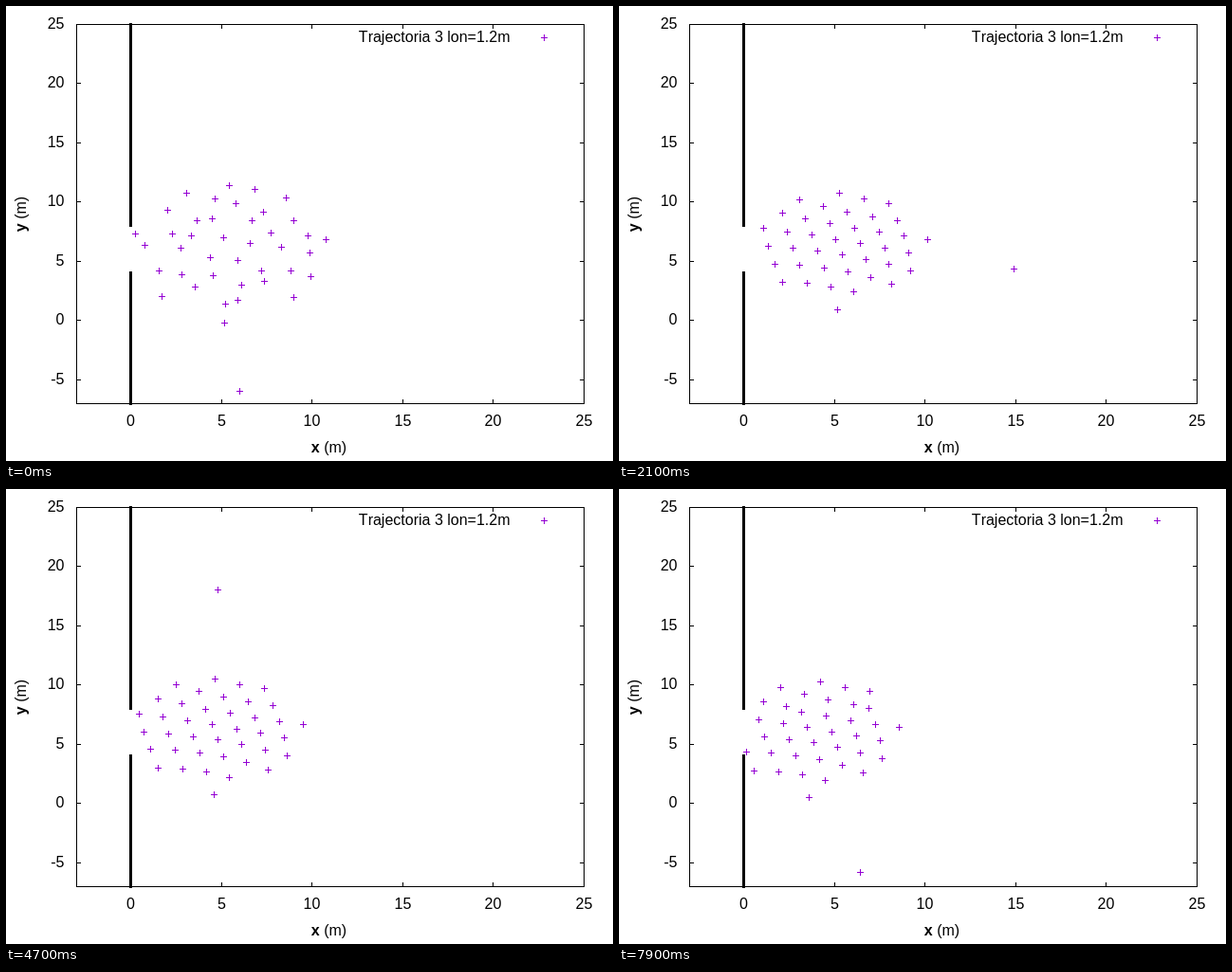
An HTML page for the animation above (8000 ms loop, 640x480 px).

```html
<!DOCTYPE html>
<html lang="es">
<head>
<meta charset="utf-8">
<title>Trajectoria 3</title>
<style>
  html, body { margin: 0; width: 100%; height: 100%; overflow: hidden; background: #fff; }
  svg { display: block; width: 640px; height: 480px; }
  text { font: 16px "Liberation Sans", Arial, sans-serif; font-kerning: none; fill: #000; }
  path { fill: none; stroke: #000; stroke-width: 1; shape-rendering: crispEdges; }
  .wall { stroke-width: 3; }
  .marks { stroke: #9400d3; }
  .bold { font-weight: bold; }
  .mid { text-anchor: middle; }
  .end { text-anchor: end; }
</style>
</head>
<body>
<svg viewBox="0 0 640 480">
  <path id="axis"/>
  <g id="labels"></g>
  <text class="mid" x="340.5" y="471"><tspan class="bold">x</tspan> (m)</text>
  <text class="mid" transform="translate(21 219.5) rotate(-90)"><tspan class="bold">y</tspan> (m)</text>
  <text class="end" x="531.5" y="38">Trajectoria 3 lon=1.2m</text>
  <path class="wall" d="M131.5 18V233M131.5 280V421"/>
  <path class="marks" id="marks"/>
</svg>
<script>
const LOOP = 8000, STEP = 100;
const byId = id => document.getElementById(id);
const clamp = v => Math.min(1, Math.max(0, v));

// Axes: 5 m per tick
function drawAxes() {
  let d = 'M74.5 19.5H609.5V419.5H74.5Z', text = '';
  for (let v = -5; v <= 25; v += 5) {
    const y = Math.round(331.4 - v * 12.5);
    d += `M74 ${y + 0.5}h5M610 ${y + 0.5}h-5`;
    text += `<text class="end" x="61.5" y="${y + 5}">${v}</text>`;
    if (v < 0) continue;
    const x = Math.round(131.3 + v * 19.1);
    d += `M${x + 0.5} 19v5M${x + 0.5} 420v-5`;
    text += `<text class="mid" x="${x + 0.5}" y="443">${v}</text>`;
  }
  byId('axis').setAttribute('d', d);
  byId('labels').innerHTML = text;
}

// Smooth curve through keys [time, x, y], slopes taken from the neighbours
function follow(keys, t) {
  const last = keys.length - 1;
  let i = 0;
  while (i < last - 1 && t >= keys[i + 1][0]) i++;
  const a = keys[i], b = keys[i + 1], span = b[0] - a[0];
  const p = (t - a[0]) / span;
  const slope = (n, c) => {
    const u = keys[Math.max(0, n - 1)], v = keys[Math.min(last, n + 1)];
    return (v[c] - u[c]) / (v[0] - u[0]) * span;
  };
  return [1, 2].map(c =>
    a[c] + (b[c] - a[c]) * p * p * (3 - 2 * p) +
    p * (1 - p) * ((1 - p) * slope(i, c) - p * slope(i + 1, c)));
}

// Lone runner around the crowd
const route = [
  [0, 246, 406], [900, 286, 402], [1800, 402, 320], [2100, 416, 277],
  [2700, 400, 190], [3100, 358, 143], [3600, 281, 110], [4300, 205, 106],
  [4700, 223, 106], [5400, 294, 122], [5900, 364, 170], [6300, 391, 217],
  [7200, 356, 352], [7900, 254, 404]];

// How far the whole crowd stands from its rest place
const drift = [
  [0, 16, -1], [900, 15, -1], [2100, 12.5, -4], [3100, 2.3, -3],
  [4700, 0.7, -1.5], [5900, 0, 0], [7900, 0, 0]];

// First row and number of rows in each lattice column, left to right
const columns = [[0, 4], [-1, 5], [-2, 7], [-2, 6], [-3, 6], [-3, 6], [-3, 5], [-1, 1]];

// Hexagonal lattice that bends and widens towards its rim
function latticePoint(i, j) {
  const s = j + 0.4 + 0.45 * i; // rows from the middle of the column
  return [
    242 + 26 * i + 6.5 * j - 0.3 * (i + 1.5) * s ** 2,
    254 + 4.5 * i + 16 * j + 0.28 * s ** 3 - 0.1 * i ** 3 + 0.15 * i * i * s];
}

let seed = 7;
function jitter(size) {
  seed = seed * 16807 % 2147483647;
  return (seed / 2147483647 * 2 - 1) * size;
}

const crowd = columns.flatMap(([first, count], c) =>
  Array.from({ length: count }, (_, n) => {
    const [x, y] = latticePoint(c - 4, first + n);
    return {
      x, y,
      scatterX: 0.13 * (x - 229) + jitter(8),
      scatterY: 0.2 * (y - 257) + jitter(8),
      pull: y < 228 ? 7.5 : 17.5 // the upper rows lag behind
    };
  }));

function crowdAt(t) {
  const [dx, dy] = follow(drift, t);
  const scatter = clamp(1 - t / 900) ** 2;
  const leave = clamp((t - 6100) / 1800);
  return crowd
    .map(m => [
      m.x + dx + m.scatterX * scatter - m.pull * leave,
      m.y + dy + m.scatterY * scatter + 1.5 * leave])
    .filter(([x]) => x > 130.5); // gone once through the door
}

function draw(t) {
  const legend = [567, 33];
  const crosses = [...crowdAt(t), follow(route, t), legend].map(point => {
    const [x, y] = point.map(Math.round);
    return `M${x - 3} ${y + 0.5}h7M${x + 0.5} ${y - 3}v7`;
  });
  byId('marks').setAttribute('d', crosses.join(''));
}

function tick() {
  draw(Math.floor(performance.now() % LOOP / STEP) * STEP);
  requestAnimationFrame(tick);
}

drawAxes();
tick();
</script>
</body>
</html>
```
